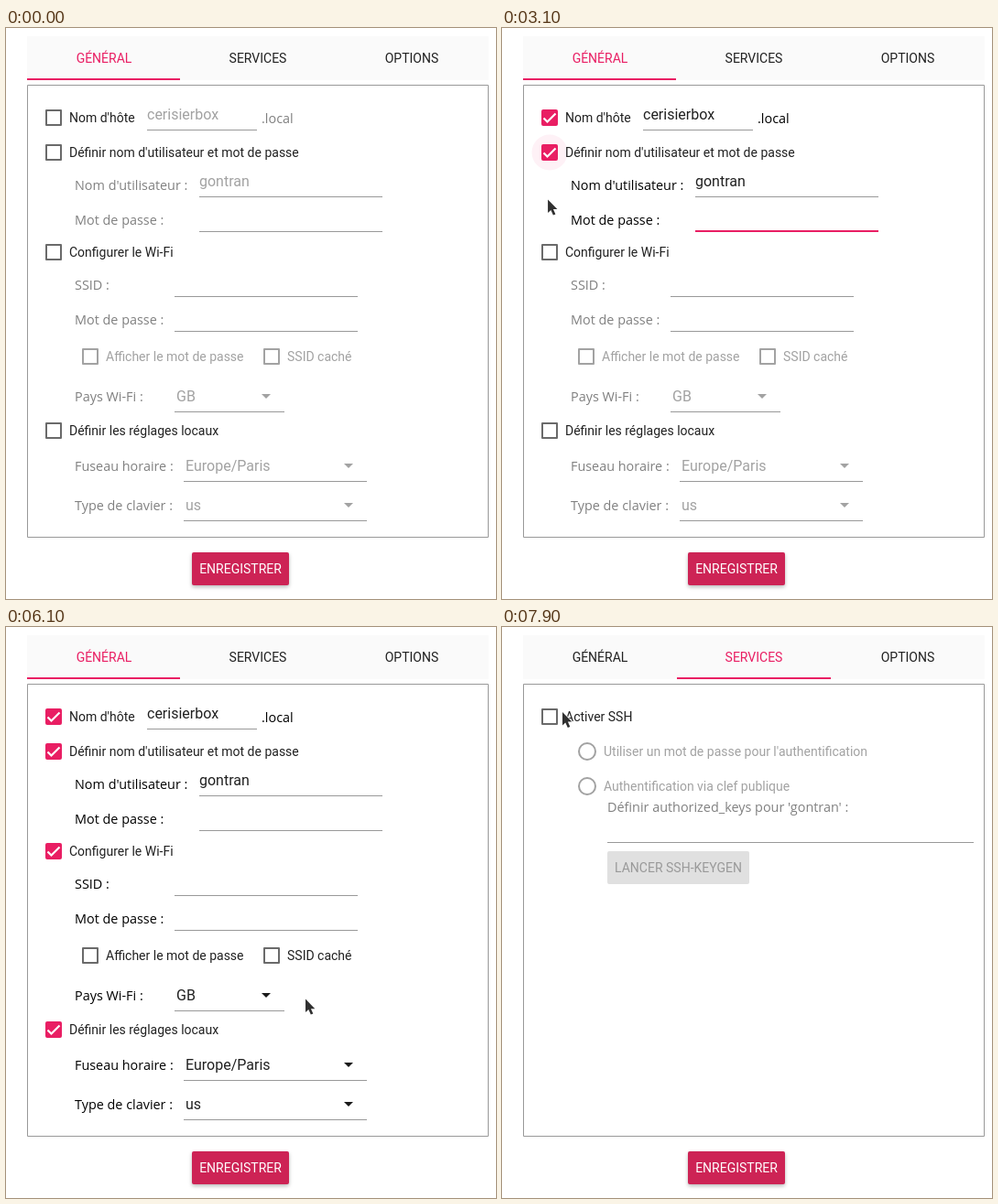
Recreate the animation shown at these times as an HTML page with a canvas. Size 535x624 px, loop 8000 ms.

```html
<!DOCTYPE html>
<html lang="fr">
<head>
<meta charset="utf-8">
<style>
  html, body { margin: 0; width: 535px; height: 624px; overflow: hidden; background: #fff; }
  canvas { display: block; }
</style>
</head>
<body>
<canvas id="stage" width="535" height="624"></canvas>
<script>
const ctx = document.getElementById('stage').getContext('2d');
const LOOP = 8000, STEP = 100, PRESS = 100, BOX_X = 52;
const PINK = '#e91e63', INK = '#212121', FADED = '#a2a2a2', BORDER = '#6a6a6a', LINE = '#999';
const HOST = 'cerisierbox', USER = 'gontran';
const UI = '14px Roboto, sans-serif';
const FIELD = '16px Roboto, sans-serif';
const LABEL = '500 14.4px "Open Sans", sans-serif';

// Moments the sections are ticked and the tab is changed
const HOST_ON = 1600, USER_ON = 2750, WIFI_ON = 3950, LOCAL_ON = 5350, TAB_ON = 7000;

const point = (x, y) => ({ x, y });
const START = point(103, 20), AT_HOST = point(45, 97), AT_USER = point(47, 146),
      AT_WIFI = point(52, 243), AT_LOCAL = point(54, 440), AT_TAB = point(273.5, 36), AT_SSH = point(65, 92);

// Pointer moves; the optional handles bend the way
const MOVES = [
  { from: 500, to: 950, a: START, b: AT_HOST },
  { from: 1700, to: 2300, a: AT_HOST, b: AT_USER },
  { from: 2700, to: 3600, a: AT_USER, b: AT_WIFI },
  { from: 4000, to: 4900, a: AT_WIFI, b: AT_LOCAL },
  { from: 5500, to: 6600, a: AT_LOCAL, b: AT_TAB, h1: point(230, 880), h2: point(490, 150) },
  { from: 7000, to: 7900, a: AT_TAB, b: AT_SSH, h1: point(275, 130), h2: point(230, 95) }
];

let t = 0, tip = null;
const clamp = v => Math.max(0, Math.min(1, v));
const progress = (from, to) => clamp((t - from) / (to - from));

function bezier(s, a, b, c, d) {
  const r = 1 - s;
  return r * r * r * a + 3 * r * r * s * b + 3 * r * s * s * c + s * s * s * d;
}

function pointerTip() {
  const move = MOVES.findLast(m => t >= m.from);
  if (!move) return null;
  const { from, to, a, b, h1 = a, h2 = b } = move, s = progress(from, to);
  return point(bezier(s, a.x, h1.x, h2.x, b.x), bezier(s, a.y, h1.y, h2.y, b.y));
}

function text(str, x, y, font, color, align = 'left') {
  ctx.font = font;
  ctx.fillStyle = color;
  ctx.textAlign = align;
  ctx.fillText(str, x, y);
}

function rect(x, y, w, h, color, radius = 0) {
  ctx.fillStyle = color;
  ctx.beginPath();
  ctx.roundRect(x, y, w, h, radius);
  ctx.fill();
}

function disc(x, y, r, color) {
  ctx.fillStyle = color;
  ctx.beginPath();
  ctx.arc(x, y, r, 0, 7);
  ctx.fill();
}

function polyline(points, color, width) {
  ctx.strokeStyle = color;
  ctx.lineWidth = width;
  ctx.lineJoin = 'miter';
  ctx.beginPath();
  points.forEach(p => ctx.lineTo(p.x, p.y));
  ctx.stroke();
}

function label(str, x, cy, on) {
  text(str, x, cy + 5, LABEL, on ? '#000' : '#808080');
}

function boxFrame(cx, cy, width, color) {
  const half = 9 - width / 2;
  ctx.strokeStyle = color;
  ctx.lineWidth = width;
  ctx.lineJoin = 'round';
  ctx.strokeRect(cx - half, cy - half, half * 2, half * 2);
}

function emptyBox(str, cx, cy, since) {
  const on = t >= since;
  boxFrame(cx, cy, 2, t >= since + PRESS ? BORDER : FADED);
  text(str, cx + 17, cy + 5, UI, on ? INK : FADED);
}

function checkBox(str, cy, since) {
  const p = progress(since, since + 100);
  if (tip && Math.hypot(tip.x - BOX_X, tip.y - cy) < 19) disc(BOX_X, cy, 19, 'rgba(0,0,0,.035)');
  if (t >= since - PRESS) {
    const alpha = .14 * (1 - progress(since, since + 600));
    disc(BOX_X, cy, 19.5 * progress(since - PRESS, since), `rgba(233,30,99,${alpha})`);
  }
  if (p < 1) {
    boxFrame(BOX_X, cy, 2 + 6 * p, BORDER);
    boxFrame(BOX_X, cy, 2 + 6 * p, `rgba(233,30,99,${p * .4})`);
  } else {
    rect(BOX_X - 9, cy - 9, 18, 18, PINK, 2);
    polyline([point(BOX_X - 6.5, cy + .5), point(BOX_X - 2.5, cy + 4.5), point(BOX_X + 6.5, cy - 4.5)], '#fff', 2.2);
  }
  text(str, BOX_X + 17, cy + 5, UI, INK);
}

// Focus lasts until the next section is pressed
function field(x, cy, w, value, since, nextOn = 0) {
  const y = cy + 12, focused = t >= since && t < nextOn - PRESS;
  if (focused) rect(x, y - 1, w, 2, PINK);
  else rect(x, y, w, 1, LINE);
  text(value, x, y - 11, FIELD, t >= since ? INK : FADED);
  if (focused && t > since && (t - since + 150) % 1000 < 500) {
    rect(x + ctx.measureText(value).width, y - 26, 2, 19, PINK);
  }
}

function combo(x, cy, w, value, on) {
  const ax = x + w - 20, ay = cy - 3;
  rect(x, cy + 16, w, 1, LINE);
  text(value, x + 2, cy + 5, FIELD, on ? INK : FADED);
  ctx.fillStyle = on ? '#1a1a1a' : FADED;
  ctx.beginPath();
  ctx.moveTo(ax - 5, ay);
  ctx.lineTo(ax + 5, ay);
  ctx.lineTo(ax, ay + 5);
  ctx.fill();
}

function tabs() {
  const current = t >= TAB_ON ? 1 : 0, width = 168;
  rect(23, 9, 3 * width, 48, '#fafafa');
  ['GÉNÉRAL', 'SERVICES', 'OPTIONS'].forEach((name, i) => {
    const x = 23 + i * width;
    const hovered = tip && tip.y < 57 && tip.x >= x && tip.x < x + width;
    const pressed = hovered && t >= TAB_ON - PRESS;
    if (hovered) rect(x, 9, width, 48, '#ebedec');
    text(name, x + width / 2, 38, UI, i === current || pressed ? PINK : INK, 'center');
  });
  const p = 1 - (1 - progress(TAB_ON, TAB_ON + 250)) ** 2;
  rect(23 + width * p, 55, width - 1 + p, 2, PINK);
}

function generalPage() {
  const left = 75, user = t >= USER_ON, wifi = t >= WIFI_ON, local = t >= LOCAL_ON;

  checkBox("Nom d'hôte", 98, HOST_ON);
  field(154, 99, 120, HOST, HOST_ON, USER_ON);
  label('.local', 279, 99, t >= HOST_ON);

  checkBox("Définir nom d'utilisateur et mot de passe", 136, USER_ON);
  label("Nom d'utilisateur :", left, 172, user);
  field(211, 172, 200, USER, USER_ON);
  label('Mot de passe :', left, 210, user);
  field(211, 210, 200, '', USER_ON, WIFI_ON);

  checkBox('Configurer le Wi-Fi', 245, WIFI_ON);
  label('SSID :', left, 281, wifi);
  field(184, 281, 200, '', WIFI_ON, LOCAL_ON);
  label('Mot de passe :', left, 319, wifi);
  field(184, 319, 200, '', WIFI_ON);
  emptyBox('Afficher le mot de passe', 92, 359, WIFI_ON);
  emptyBox('SSID caché', 290, 359, WIFI_ON);
  label('Pays Wi-Fi :', left, 403, wifi);
  combo(184, 403, 120, 'GB', wifi);

  checkBox('Définir les réglages locaux', 440, LOCAL_ON);
  label('Fuseau horaire :', left, 479, local);
  combo(194, 479, 200, 'Europe/Paris', local);
  label('Type de clavier :', left, 522, local);
  combo(194, 522, 200, 'us', local);
}

function radio(str, cy) {
  ctx.strokeStyle = FADED;
  ctx.lineWidth = 2;
  ctx.beginPath();
  ctx.arc(93, cy, 9, 0, 7);
  ctx.stroke();
  text(str, 111, cy + 5, UI, FADED);
}

function servicesPage() {
  emptyBox('Activer SSH', BOX_X, 98, 0);
  radio("Utiliser un mot de passe pour l'authentification", 136);
  radio('Authentification via clef publique', 174);
  label(`Définir authorized_keys pour '${USER}' :`, 115, 197, false);
  rect(115, 235, 400, 1, LINE);
  rect(115, 245, 155, 36, '#e0e0e0', 2);
  text('LANCER SSH-KEYGEN', 192.5, 268, UI, '#999', 'center');
}

function saveButton() {
  ctx.shadowColor = 'rgba(0,0,0,.28)';
  ctx.shadowBlur = 4;
  ctx.shadowOffsetY = 2;
  rect(203, 573, 106, 36, '#cd2355', 2);
  ctx.shadowColor = 'transparent';
  text('ENREGISTRER', 256, 596, UI, '#fff', 'center');
}

function drawPointer() {
  if (!tip) return;
  const arrow = new Path2D('M0 0V14.5L3.3 11.5L5.8 17L8.3 16L5.9 10.6H10.3Z');
  ctx.save();
  ctx.translate(tip.x + 1, tip.y + 1);
  ctx.strokeStyle = '#fff';
  ctx.lineWidth = 1.6;
  ctx.lineJoin = 'round';
  ctx.stroke(arrow);
  ctx.fillStyle = '#303030';
  ctx.fill(arrow);
  ctx.restore();
}

function draw() {
  t = Math.floor(performance.now() % LOOP / STEP) * STEP;
  tip = pointerTip();
  rect(0, 0, 535, 624, '#fff');
  tabs();
  ctx.strokeStyle = LINE;
  ctx.lineWidth = 1;
  ctx.lineJoin = 'round';
  ctx.strokeRect(23.5, 62.5, 503, 494);
  if (t < TAB_ON) generalPage();
  else servicesPage();
  saveButton();
  drawPointer();
  requestAnimationFrame(draw);
}
draw();
</script>
</body>
</html>
```
